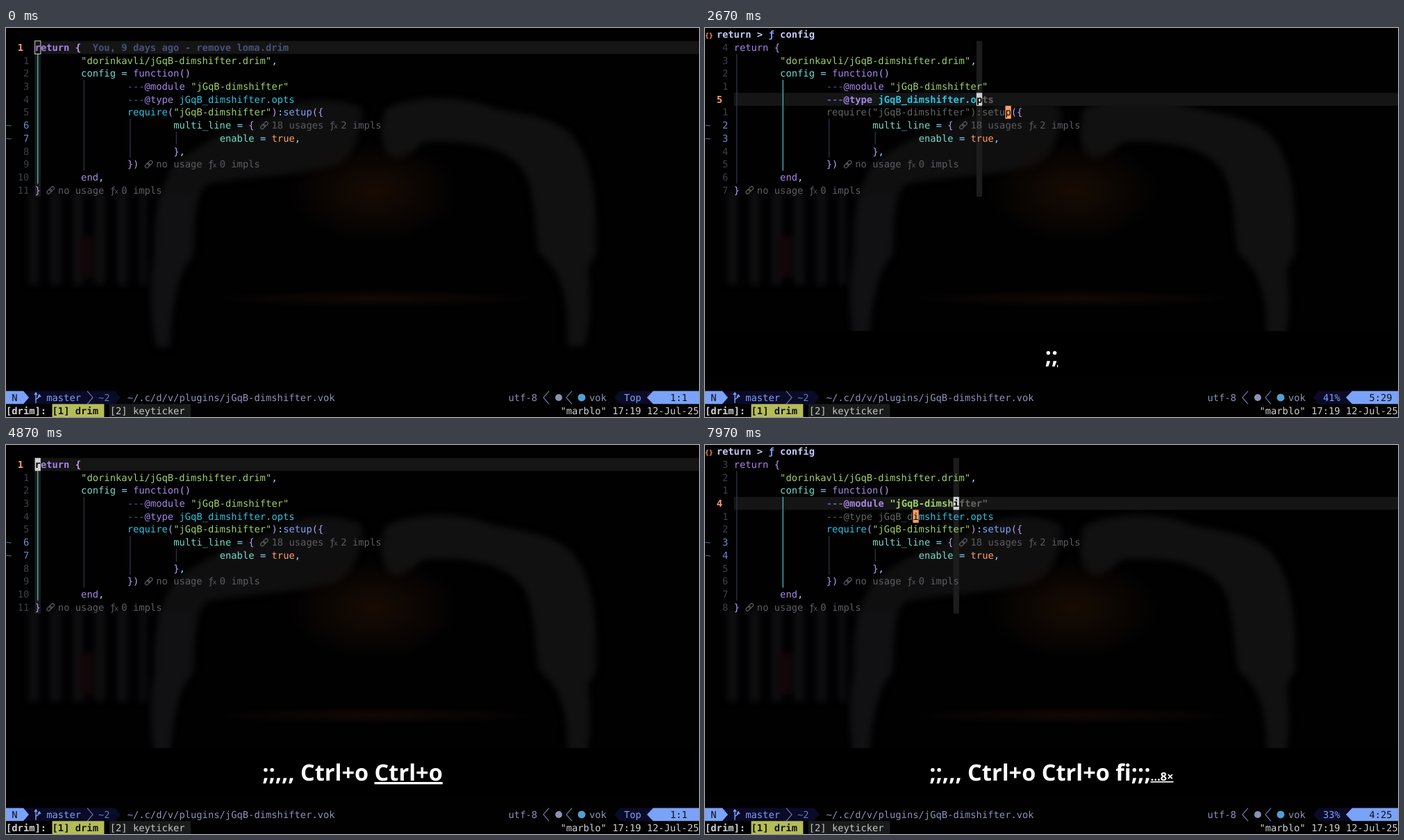
An HTML page that plays this animation: 998x561 px, repeating every 8000 ms.

```html
<!DOCTYPE html>
<html lang="en">
<head>
<meta charset="utf-8">
<style>
  html, body { margin: 0; width: 100%; height: 100%; overflow: hidden; background: #010102; }
  svg { display: block; width: 100vw; height: 100vh; }
  filter { color-interpolation-filters: sRGB; }
  text { white-space: pre; text-rendering: geometricPrecision; font: 13.815px "DejaVu Sans Mono", monospace; }
  .bold { font-weight: 700; }
  .keys { font: 700 32.5px "Noto Sans", "Open Sans", sans-serif; fill: #fff; text-anchor: middle; }
  .recent { text-decoration: underline; text-decoration-skip-ink: none; }
  .small { font-size: 16.5px; }
</style>
</head>
<body>
<svg viewBox="0 0 998 561">
  <defs>
    <filter id="soft" x="-20%" y="-20%" width="140%" height="140%"><feGaussianBlur stdDeviation="5"/></filter>
    <radialGradient id="ember"><stop stop-color="#170b03"/><stop offset="1" stop-color="#170b03" stop-opacity="0"/></radialGradient>
    <radialGradient id="shelf"><stop stop-color="#120904"/><stop offset="1" stop-color="#120904" stop-opacity="0"/></radialGradient>
    <pattern id="books" width="32" height="180" patternUnits="userSpaceOnUse">
      <rect width="15" height="180" fill="#0e0e10"/>
    </pattern>
  </defs>
  <rect width="998" height="561" fill="#010102"/>
  <g filter="url(#soft)">
    <rect x="32" y="235" width="170" height="135" fill="url(#books)"/>
    <rect x="106" y="300" width="20" height="60" fill="#120608"/>
    <path fill="#0f0f10" d="M512 115C480 98 420 100 395 122C330 140 270 170 240 200C215 240 212 290 215 328L270 325C272 280 272 240 290 225C340 215 400 215 470 200C500 190 515 150 512 115Z"/>
    <path fill="#111112" d="M545 118C580 98 640 98 680 108C720 125 770 120 810 150C850 190 850 260 850 325L838 345C842 390 842 420 834 458H808C812 390 800 350 768 325C760 290 765 240 745 205C720 170 660 160 600 165C570 195 545 200 540 150Z"/>
    <path fill="#111113" d="M220 240H270V328C250 345 238 400 236 460H216C208 410 206 370 214 328Z"/>
  </g>
  <ellipse cx="530" cy="235" rx="125" ry="75" fill="url(#ember)"/>
  <ellipse cx="530" cy="390" rx="240" ry="13" fill="url(#shelf)"/>
  <g id="scene"></g>
</svg>
<script>
const W = 998 / 120, H = 18.7, LOOP = 8000;
const COLORS = {
  k: '#a585e6', b: '#b79cf0', d: '#b79cf0', s: '#9ece6a', o: '#89ddff', m: '#73daca',
  c: '#565f89', t: '#2ac3de', f: '#7aa2f7', n: '#ff9e64'
};
const DIM = '#62665f', HINT = '#5c5c62', BLUE = '#7aa2f7', NAVY = '#0b0a28';

// Tab depth, then pieces that begin with a colour key.
const LINES = [
  [0, 'kreturn |b{'],
  [1, 's"dorinkavli/jGqB-dimshifter.drim"|o,'],
  [1, 'mconfig |o= |kfunction|d()'],
  [2, 'c---|k@module |s"jGqB-dimshifter"'],
  [2, 'c---|k@type |tjGqB_dimshifter.opts'],
  [2, 'trequire|d(|s"jGqB-dimshifter"|d)|o:|fsetup|d({'],
  [3, 'mmulti_line |o= |b{'],
  [4, 'menable |o= |ntrue|o,'],
  [3, 'b}|o,'],
  [2, 'd})'],
  [1, 'kend|o,'],
  [0, 'b}']
];
const HINTS = [[7, 44, '18 usages', '2 impls'], [10, 24, 'no usage', '0 impls'], [12, 7, 'no usage', '0 impls']];
const GUIDES = [[5, 2, 11], [13, 4, 10], [21, 7, 9], [29, 8, 8]];

// Time, earlier keys, newest key, sought letter, its occurrence, search direction.
const JUMPS = ';;,,, Ctrl+o Ctrl+o ';
const STEPS = [
  [0, '', '', 'r', 0, 0],
  [430, '', 'Super+4', 'r', 0, 0],
  [900, 'Super+4 ', 'f', 'r', 0, 0],
  [1130, 'Super+4 f', 'p', 'p', 0, 1],
  [2130, '', '', 'p', 0, 1],
  [2330, '', ';', 'p', 1, 1],
  [2650, ';', ';', 'p', 1, 1],
  [2710, ';', ';', 'p', 2, 1],
  [3230, ';;', ',', 'p', 1, -1],
  [3560, ';;,', ',', 'p', 0, -1],
  [3900, ';;,,', ',', 'p', 0, -1],
  [4330, ';;,,, ', 'Ctrl+o', 'p', 2, 0],
  [4830, ';;,,, Ctrl+o ', 'Ctrl+o', 'r', 0, 0],
  [5370, JUMPS, 'f', 'r', 0, 0],
  [5730, JUMPS + 'f', 'i', 'i', 0, 1],
  [6270, JUMPS + 'fi', ';', 'i', 1, 1],
  [6500, JUMPS + 'fi;', ';', 'i', 2, 1],
  [6800, JUMPS + 'fi;;', ';', 'i', 3, 1],
  ...[7030, 7250, 7470, 7690, 7930].map((at, n) =>
    [at, JUMPS + 'fi;;;', `…${n + 4}×`, 'i', n + 4, 1])
];

const cells = LINES.flatMap(([tabs, code], n) => {
  let col = 5 + tabs * 8;
  return code.split('|').flatMap(piece =>
    [...piece.slice(1)].map(ch => ({ ch, row: n + 1, col: col++, color: COLORS[piece[0]] })));
});

const box = (col, row, w, h, fill, extra = '') =>
  `<rect x="${col * W}" y="${row * H}" width="${w * W}" height="${h * H}" fill="${fill}" ${extra}/>`;
const put = (col, row, str, fill, bold = false, extra = '') =>
  `<text x="${col * W}" y="${row * H + 14.2}" fill="${fill}" class="${bold ? 'bold' : ''}" ${extra}>${str}</text>`;
const shape = (d, fill) => `<path d="${d}" fill="${fill}"/>`;
const stroke = (d, color, width = 1.2) => `<path d="${d}" fill="none" stroke="${color}" stroke-width="${width}"/>`;

function hints() {
  return HINTS.map(([row, col, usage, impls]) => {
    const x = col * W, y = row * H, fx = col + usage.length + 3;
    const link = `<g transform="translate(${x + 6} ${y + 9.5}) rotate(-45)" fill="none" stroke="${HINT}" stroke-width="1.2">
      <rect x="-6.5" y="-2.3" width="7.5" height="4.6" rx="2.3"/><rect x="-1" y="-2.3" width="7.5" height="4.6" rx="2.3"/></g>`;
    return link + put(col + 2, row, usage, HINT) +
      put(fx, row, 'ƒ<tspan dx="-2" font-size="10">x</tspan>', HINT, false, 'font-style="italic"') +
      put(fx + 2, row, impls, HINT);
  }).join('');
}

function statusBar() {
  const top = 28 * H, end = 29 * H, mid = (top + end) / 2;
  const chevron = (x, dir) => stroke(`M${x} ${top}l${8 * dir} ${H / 2}l${-8 * dir} ${H / 2}`, '#6f7ba8');
  return shape(`M25 ${top}H157L165 ${mid}L157 ${end}H25Z`, NAVY) +
    shape(`M0 ${top}H25L33 ${mid}L25 ${end}H0Z`, BLUE) +
    put(1, 28, 'N', '#10101c') +
    stroke('M43 526V541M43 537C43 533 48 535 48 530M41 529L43 526L45 529M46 532L48 529L50 532', BLUE, 1.4) +
    put(7, 28, 'master', BLUE) + chevron(117, 1) + put(16, 28, '~2', '#5d7fb8') +
    put(21, 28, '~/.c/d/v/plugins/jGqB-dimshifter.vok', '#8b93b5') +
    put(87, 28, 'utf-8', '#8b93b5') + chevron(782, -1) +
    `<circle cx="796" cy="${mid}" r="5" fill="#8b93b5"/>` + chevron(815, -1) +
    `<circle cx="829" cy="${mid}" r="5.5" fill="#51a0cf"/>` + put(101, 28, 'vok', '#8b93b5') +
    shape(`M884 ${top}H933V${end}H884L876 ${mid}Z`, NAVY) +
    shape(`M932 ${top}H998V${end}H932L923 ${mid}Z`, BLUE) +
    put(0, 29, '[drim]:', '#d4d4d4', true) +
    box(8, 29, 9, 1, '#b5bd58') + put(8, 29, '[1] drim', '#111', true) +
    box(17.9, 29, 14.1, 1, '#1a1c1c') + put(18, 29, '[2] keyticker', '#c4c8c6') +
    put(96, 29, '"marblo" 17:19 12-Jul-25', '#d0d0d0');
}
const FIXED = hints() + statusBar();

function gutter(current) {
  return LINES.map((_, n) => {
    const row = n + 1, changed = row === 7 || row === 8;
    const sign = changed ? put(0, row, '~', '#4e6b94') : '';
    if (row === current) return sign + put(2, row, row, '#ff9e64', true);
    const label = String(Math.abs(row - current));
    return sign + put(4 - label.length, row, label, changed ? '#5f8fd0' : '#3b4048');
  }).join('');
}

function guides(row) {
  const active = row < 3 ? 0 : row < 6 ? 1 : 2;
  return GUIDES.map(([col, from, to], n) =>
    stroke(`M${(col + .5) * W} ${from * H}V${(to + 1) * H}`, n === active ? '#4fb8bd' : '#2f3247', 1.3)).join('');
}

function code(cursor, targets, dir, hollow) {
  const order = c => c.row * 200 + c.col;
  const here = order(cursor);
  const reach = targets.reduce((far, c) => dir > 0 ? Math.max(far, order(c)) : Math.min(far, order(c)), here);
  let out = '', run = null;
  const flush = () => {
    if (run) out += put(run.col, run.row, run.str, run.fill, run.row === cursor.row);
    run = null;
  };
  for (const c of cells) {
    const at = order(c);
    let fill = c.color;
    if ((at - here) * (at - reach) < 0) fill = DIM;
    if (targets.includes(c)) { out += box(c.col, c.row, 1, 1, '#ff9e64'); fill = '#000'; }
    if (c === cursor) {
      out += hollow ? box(c.col, c.row, 1, 1, 'none', 'stroke="#d0d0d0"') : box(c.col, c.row, 1, 1, '#d2d2d2');
      if (!hollow) fill = '#000';
    }
    if (!run || run.row !== c.row || run.fill !== fill) {
      flush();
      run = { col: c.col, row: c.row, fill, str: '' };
    }
    run.str += c.ch;
  }
  flush();
  return out;
}

function breadcrumb(row) {
  if (row === 1) return '';
  const start = put(0, 0, '{}', '#ff9e64', true, 'style="font-size:9.5px"') + put(2, 0, 'return >', '#c0caf5', true);
  return start + (row === 2
    ? put(10.9, 0, 'abc', '#9ece6a', true, 'style="font-size:7px"') + put(13, 0, '[1]', '#c0caf5', true)
    : put(11, 0, 'ƒ', BLUE, true, 'font-style="italic"') + put(13, 0, 'config', '#c0caf5', true));
}

function keyBand(before, newest, fresh) {
  if (!newest) return '';
  const style = (fresh ? 'recent ' : '') + (newest[0] === '…' ? 'small' : '');
  return `<rect y="437" width="998" height="67" fill="#000"/>
    <text class="keys" x="499" y="484">${before}<tspan class="${style}">${newest}</tspan></text>`;
}

function render(index, fresh) {
  const [, before, newest, letter, nth, dir] = STEPS[index];
  const found = cells.filter(c => c.ch === letter);
  const cursor = found[nth], { row, col } = cursor;
  const ahead = dir > 0 ? found.slice(nth + 1) : dir < 0 ? found.slice(0, nth).reverse() : [];
  const nextLine = ahead.find(c => c.row !== row);
  const targets = ahead.filter(c => c.row === row || c === nextLine);
  const rulerCol = col - 4 - 7 * LINES[row - 1][0];
  const place = row === 1 ? 'Top' : Math.floor(row / 12 * 100) + '%';
  return box(col, 1, 1, 12, '#1c1c1d') + box(5, row, 115, 1, '#151516') +
    guides(row) + gutter(row) + breadcrumb(row) + FIXED +
    code(cursor, targets, dir, index === 0) +
    (index < 3 ? put(15, 1, 'You, 9 days ago - remove loma.drim', '#485078', true) : '') +
    put(107, 28, place, BLUE) + put(115, 28, `${row}:${rulerCol}`, '#10101c') +
    keyBand(before, newest, fresh);
}

const scene = document.getElementById('scene');
let shown = '';
function tick() {
  const t = performance.now() % LOOP;
  const index = STEPS.findLastIndex(s => s[0] <= t);
  const fresh = t - STEPS[index][0] < 200;
  const state = index + '/' + fresh;
  if (state !== shown) {
    scene.innerHTML = render(index, fresh);
    shown = state;
  }
  requestAnimationFrame(tick);
}
tick();
</script>
</body>
</html>
```
